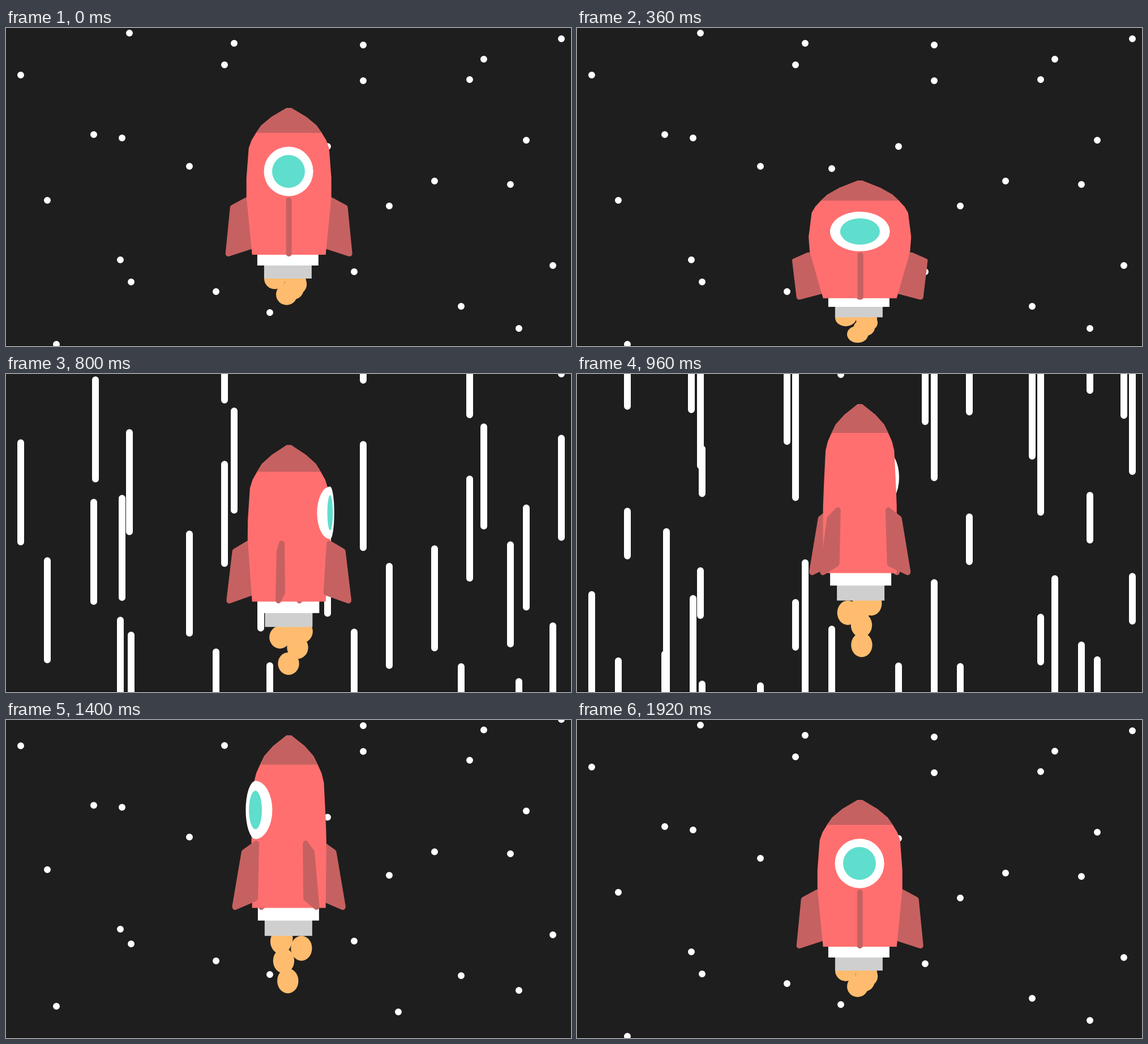
An HTML page with a canvas for the animation above (1960 ms loop, 998 by 561 pixels).

```html
<!DOCTYPE html>
<html lang="en">
<head>
<meta charset="utf-8">
<title>Rocket</title>
<style>
  html, body { margin: 0; width: 100%; height: 100%; overflow: hidden; background: #1e1e1e; }
  canvas { display: block; width: 998px; height: 561px; }
</style>
</head>
<body>
<canvas id="stage" width="998" height="561"></canvas>
<script>
const W = 998, H = 561, LOOP = 1960, STEP = 40, CYCLE = 48;
const RED = '#ff6f6f', DARK = '#c66161', TEAL = '#5fdecd', GREY = '#cfcfcf', FIRE = '#ffbc6e';
const ctx = document.getElementById('stage').getContext('2d');

// Time is counted in steps of 40 ms, f = 0 to 48.

// Eased path from a to b over n steps, with speeds va and vb at its ends.
function glide(f, n, a, b, va = 0, vb = 0) {
  const k = f / n, s = k * k * (3 - 2 * k);
  return a + (b - a) * s + n * (va * k * (1 - k) ** 2 - vb * k * k * (1 - k));
}

// Passes through rest at the given speed, dips to squash, then reaches stretch.
function swing(f, rest, speed, squash, squashAt, stretch, stretchAt) {
  if (f < squashAt) return glide(f, squashAt, rest, squash, speed, 0);
  if (f < stretchAt) return glide(f - squashAt, stretchAt - squashAt, squash, stretch);
  return glide(f - stretchAt, CYCLE - stretchAt, stretch, rest, 0, speed);
}

const tipY = f => swing(f, 141, 11.3, 270, 9.5, 11, 29);
const baseY = f => swing(f, 400, 6.3, 482, 11, 321, 29);
const bulge = f => swing(f, 75, .9, 92, 11, 62, 26);
const thrust = f => f < 31 ? glide(f, 31, 0, 1) : glide(f - 31, CYCLE - 31, 1, 0);

// One full turn: speeds up for 18 steps, slows down for 22.
function spin(f) {
  const turn = f < 26 ? (Math.max(0, f - 8) / 18) ** 2 : 2 - ((CYCLE - f) / 22) ** 2;
  return Math.PI * turn;
}

// leave: how far the departing streak is at step 24; near: where the returning one is
// at step 30; wrap: layers that also get streaks passing through.
const layers = [
  { leave: 753, near: 43, wrap: 654,
    stars: [[218, 9], [386, 65], [631, 30], [819, 91], [981, 19]] },
  { leave: 306, near: -45,
    stars: [[26, 83], [155, 188], [158, -28], [631, 93], [844, 55], [568, 209], [757, 270],
            [324, 244], [919, 198], [403, 27]] },
  { leave: 202, near: -58,
    stars: [[205, 194], [73, 304], [202, 409], [371, 465], [966, 419], [677, 314], [891, 276],
            [804, 491], [615, 430], [450, 248]] },
  { leave: 99, near: -123, wrap: 0,
    stars: [[221, 448], [466, 502], [906, 530], [89, 558], [693, 568]] }
];

// Vertical offsets [top, bottom] of every streak in a layer.
function streaks({ leave, near, wrap }, f) {
  if (f <= 16) return [[0, 0]];
  const settle = .2 * near - 28.5;
  if (f >= 35) {
    const y = settle * Math.max(0, 1 - (f - 35) / 7) ** 2;
    return [[y, y]];
  }
  const k = (f - 16) / 8, top = leave * k ** 3;
  const passes = wrap !== undefined;
  const rush = (low, speed) => {
    const y = low + speed * (f - 30);
    return [y - 50 * (36 - f), y];
  };
  const list = [[top, top + 700 * k * k]];
  if (passes) {
    const y = wrap - 237 + 109 * (f - 24);
    list.push([y - 79, y]);
  }
  if (wrap) list.push(rush(wrap - 123, 63));
  if (f <= 30) {
    list.push(rush(near, passes ? 63 : 48));
  } else {
    const q = (f - 30) / 5, y = near + (settle - near) * q;
    list.push([y - 300 * (1 - q) ** 2, y]);
  }
  return list;
}

function drawStars(f) {
  ctx.strokeStyle = '#fff';
  ctx.lineWidth = 12;
  ctx.lineCap = 'round';
  ctx.beginPath();
  for (const layer of layers) {
    for (const [top, low] of streaks(layer, f)) {
      for (const [x, y] of layer.stars) {
        ctx.moveTo(x, y + top);
        ctx.lineTo(x, y + low + .01);
      }
    }
  }
  ctx.stroke();
}

// Right edge of the hull at rest: [half width, height above the base]
const hull = [[4, 259], [31, 243], [49, 228], [58, 215], [66, 202], [71, 188], [75, 135], [75, 102], [65, 0]];

function polygon(points, color) {
  ctx.fillStyle = color;
  ctx.beginPath();
  points.forEach(([x, y]) => ctx.lineTo(x, y));
  ctx.closePath();
  ctx.fill();
}

function ellipse(x, y, rx, ry, color, from = 0, to = 2 * Math.PI) {
  ctx.fillStyle = color;
  ctx.beginPath();
  ctx.ellipse(x, y, rx, ry, 0, from, to);
  ctx.fill();
}

function drawHull(edge, color) {
  polygon([...edge, ...edge.map(([x, y]) => [-x, y]).reverse()], color);
}

function drawFin(angle, b) {
  const s = Math.sin(angle);
  polygon([[b, -96], [b + 24, -83], [107, -2], [67, -15]].map(([r, y]) => [r * s, y]), DARK);
  ctx.strokeStyle = DARK;
  ctx.lineWidth = 10;
  ctx.lineJoin = 'round';
  ctx.stroke();
}

// A disc on the hull with a dome reaching inwards.
function drawPorthole(angle, b) {
  const s = Math.sin(angle), c = Math.cos(angle), y = -147, r = 43.5;
  const flat = Math.abs(c) * b / 75, x = 1.02 * b * s - .7 * c;
  const dome = r * flat + .22 * b * Math.abs(s);
  const inward = s > 0 ? Math.PI / 2 : -Math.PI / 2;
  ellipse(x, y, r * flat, r, '#fff');
  ellipse(x, y, dome, r, '#fff', inward, inward + Math.PI);
  if (c > 0) ellipse(x, y, 29 * flat, 29, TEAL);
}

// Five puffs weave to and fro around the axis, tighter and lower one by one.
function drawFlame(angle, e) {
  for (let i = 0; i < 5; i++) {
    const t = i / 4, r = 25 - 21 * t ** 3;
    const a = (Math.abs(i - 2) * 117 - 55) * Math.PI / 180;
    const drop = 42 + 28 * t ** 1.5 + e * (5 + 41 * t ** 3);
    ellipse(r * Math.cos(a - angle), drop, 18.7, 18.7, FIRE);
  }
}

function drawRocket(f) {
  const base = baseY(f), b = bulge(f), angle = spin(f), c = Math.cos(angle);
  const fins = [0, 1, 2, 3].map(i => angle + i * Math.PI / 2);
  const inFront = a => Math.cos(a) > .05;

  ctx.save();
  ctx.translate(499.7, base);
  ctx.scale(1, (base - tipY(f)) / 259);

  drawFlame(angle, thrust(f));
  ctx.fillStyle = GREY;
  ctx.fillRect(-1.8 * c - 42, 18, 84, 24);
  ctx.fillStyle = '#fff';
  ctx.fillRect(-1.8 * c - 54, -1, 108, 20);

  fins.filter(a => !inFront(a)).forEach(a => drawFin(a, b));
  if (c <= 0) drawPorthole(angle, b);

  const swell = h => (b - 75) * Math.sin(Math.PI * (1 - h / 259) ** .8);
  const edge = hull.map(([w, h]) => [w + swell(h), -h]);
  drawHull(edge, RED);
  drawHull(edge.slice(0, 4), DARK);

  fins.filter(inFront).forEach(a => drawFin(a, b));
  if (c > 0) drawPorthole(angle, b);
  ctx.restore();
}

const start = performance.now();
function draw() {
  const f = Math.floor((performance.now() - start) % LOOP / STEP);
  ctx.fillStyle = '#1e1e1e';
  ctx.fillRect(0, 0, W, H);
  ctx.fillStyle = '#111';
  ctx.fillRect(0, H - 1, W, 1);
  drawStars(f);
  drawRocket(f);
  requestAnimationFrame(draw);
}
draw();
</script>
</body>
</html>
```
